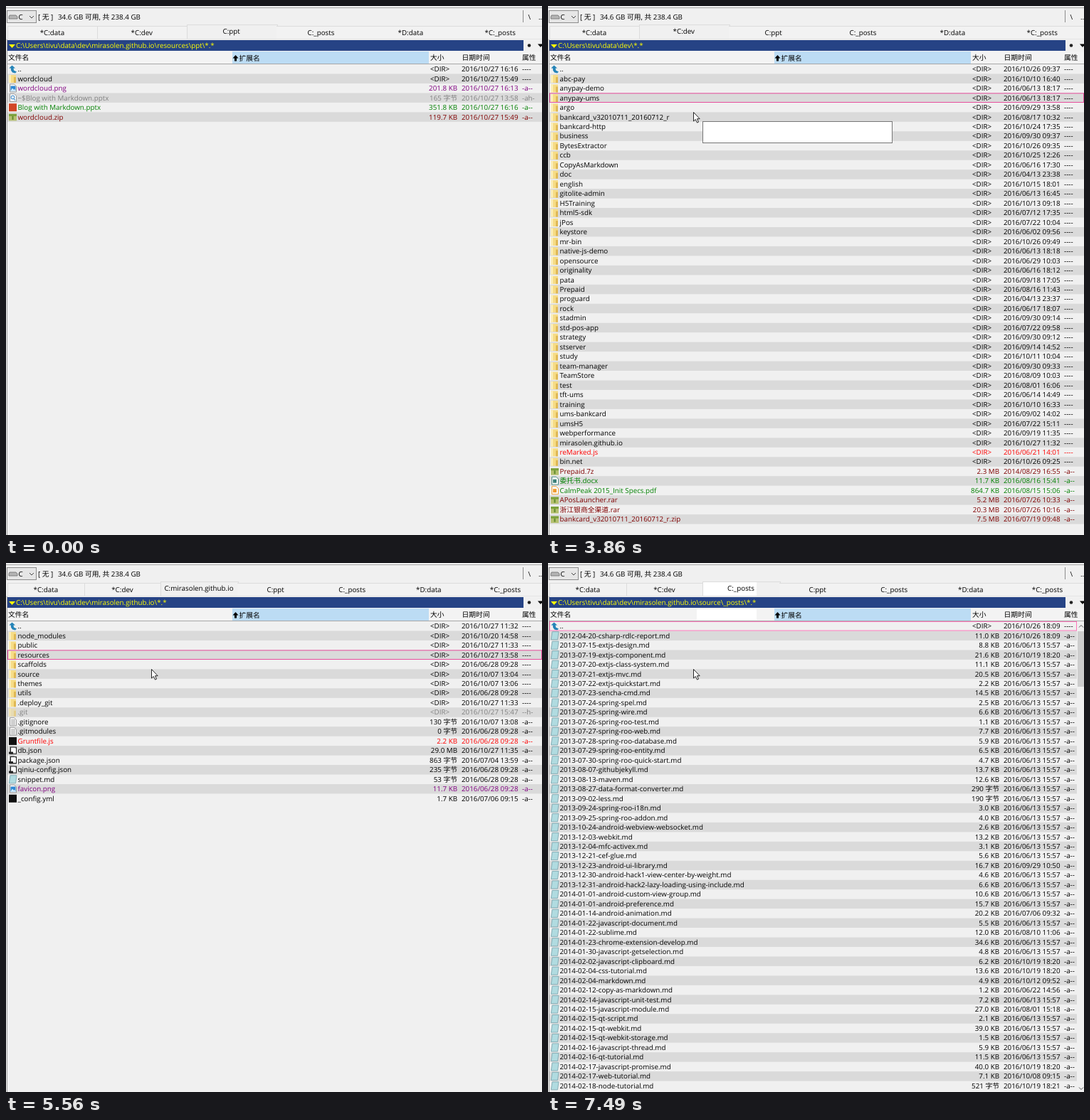
Write an HTML page with a canvas that moves like this. It is 753 px wide and 744 px high and loops after 8 s.

```html
<!DOCTYPE html>
<html lang="zh">
<head>
<meta charset="utf-8">
<title>File manager</title>
<style>
html, body { margin: 0; width: 100%; height: 100%; overflow: hidden; background: #f0f0f0 }
canvas { display: block }
</style>
</head>
<body>
<canvas id="stage" width="753" height="744"></canvas>
<script>
const LOOP = 8000, TOP = 82, PITCH = 13.47;
const ctx = document.getElementById('stage').getContext('2d');
const HOME = 'C:\\Users\\tivu\\data\\dev\\', REPO = 'mirasolen.github.io';
const TABS = ['*C:data', '*C:dev', 'C:ppt', 'C:_posts', '*D:data', '*C:_posts'];
const withTab = name => [...TABS.slice(0, 2), name, ...TABS.slice(2)];

// One row per line: name|size|date|attributes; no size means a folder.
function rows(up, text, usual) {
  const list = text.trim().split('\n').map(line => {
    const [name, size, date, attr] = line.split('|');
    return { name, size, date: date || usual, attr: attr || (size ? '-a--' : '----') };
  });
  return [{ name: '..', date: up, attr: '----' }, ...list];
}

const screens = {
  ppt: { tabs: TABS, active: 2, path: REPO + '\\resources\\ppt\\', rows: rows('10/27 16:16', `
wordcloud||10/27 15:49
wordcloud.png|201.8 KB|10/27 16:13
~$Blog with Markdown.pptx|165 字节|10/27 13:58|-ah-
Blog with Markdown.pptx|351.8 KB|10/27 16:16
wordcloud.zip|119.7 KB|10/27 15:49`) },
  dev: { tabs: TABS, active: 1, path: '', rows: rows('10/26 09:37', `
abc-pay||10/10 16:40
anypay-demo||06/13 18:17
anypay-ums||06/13 18:17
argo||09/29 13:58
bankcard_v32010711_20160712_r||08/17 10:32
bankcard-http||10/24 17:35
business||09/30 09:37
BytesExtractor||10/26 09:35
ccb||10/25 12:26
CopyAsMarkdown||06/16 17:30
doc||04/13 23:38
english||10/15 18:01
gitolite-admin||06/13 16:45
H5Training||10/13 09:18
html5-sdk||07/12 17:35
jPos||07/22 10:04
keystore||06/02 09:56
mr-bin||10/26 09:49
native-js-demo||06/13 18:18
opensource||06/29 10:03
originality||06/16 18:12
pata||09/18 17:05
Prepaid||08/16 11:43
proguard||04/13 23:37
rock||06/17 18:07
stadmin||09/30 09:14
std-pos-app||07/22 09:58
strategy||09/30 09:12
stserver||09/14 14:52
study||10/11 10:04
team-manager||09/30 09:33
TeamStore||08/09 10:03
test||08/01 16:06
tft-ums||06/14 14:49
training||10/10 16:33
ums-bankcard||09/02 14:02
umsH5||07/22 15:11
webperformance||09/19 11:35
${REPO}||10/27 11:32
reMarked.js||06/21 14:01
bin.net||10/26 09:25
Prepaid.7z|2.3 MB|2014/08/29 16:55
委托书.docx|11.7 KB|08/16 15:41
CalmPeak 2015_Init Specs.pdf|864.7 KB|08/15 15:06
APosLauncher.rar|5.2 MB|07/26 10:33
浙江银商全渠道.rar|20.3 MB|07/26 10:16
bankcard_v32010711_20160712_r.zip|7.5 MB|07/19 09:48`) },
  repo: { tabs: withTab('C:' + REPO), active: 2, path: REPO + '\\', rows: rows('10/27 11:32', `
node_modules||10/20 14:58
public||10/27 11:33
resources||10/27 13:58
scaffolds||06/28 09:28
source||10/07 13:04
themes||10/07 13:06
utils||06/28 09:28
.deploy_git||10/27 11:33
.git||10/27 15:47|--h-
.gitignore|130 字节|10/07 13:08
.gitmodules|0 字节
Gruntfile.js|2.2 KB
db.json|29.0 MB|10/27 11:35
package.json|863 字节|07/04 13:59
qiniu-config.json|235 字节
snippet.md|53 字节
favicon.png|11.7 KB
_config.yml|1.7 KB|07/06 09:15`, '06/28 09:28') },
  source: { tabs: withTab('C:source'), active: 2, path: REPO + '\\source\\', pink: '#ff69b4',
    rows: rows('10/07 13:04', `
_drafts||10/19 18:20
_posts||10/26 18:09
stratege||08/22 09:04
.gitignore|28 字节|06/13 15:57
CNAME|16 字节|06/13 15:57
_mdwriter.cson|4.9 KB|10/07 13:04`) },
  posts: { tabs: withTab('C:_posts'), active: 2, path: REPO + '\\source\\_posts\\', pink: '#ff69b4', scroll: true,
    rows: rows('10/26 18:09', `
2012-04-20-csharp-rdlc-report.md|11.0 KB|10/26 18:09
2013-07-15-extjs-design.md|8.8 KB
2013-07-19-extjs-component.md|21.6 KB|10/19 18:20
2013-07-20-extjs-class-system.md|11.1 KB
2013-07-21-extjs-mvc.md|20.5 KB
2013-07-22-extjs-quickstart.md|2.2 KB
2013-07-23-sencha-cmd.md|14.5 KB
2013-07-24-spring-spel.md|2.5 KB
2013-07-25-spring-wire.md|6.6 KB
2013-07-26-spring-roo-test.md|1.1 KB
2013-07-27-spring-roo-web.md|7.7 KB
2013-07-28-spring-roo-database.md|5.9 KB
2013-07-29-spring-roo-entity.md|6.5 KB
2013-07-30-spring-roo-quick-start.md|4.7 KB
2013-08-07-githubjekyll.md|13.7 KB
2013-08-13-maven.md|12.6 KB
2013-08-27-data-format-converter.md|290 字节
2013-09-02-less.md|190 字节
2013-09-24-spring-roo-i18n.md|3.0 KB
2013-09-25-spring-roo-addon.md|4.0 KB
2013-10-24-android-webview-websocket.md|2.6 KB
2013-12-03-webkit.md|13.2 KB
2013-12-04-mfc-activex.md|3.1 KB
2013-12-21-cef-glue.md|5.6 KB
2013-12-23-android-ui-library.md|16.7 KB|09/29 10:50
2013-12-30-android-hack1-view-center-by-weight.md|4.6 KB
2013-12-31-android-hack2-lazy-loading-using-include.md|6.6 KB
2014-01-01-android-custom-view-group.md|10.6 KB
2014-01-01-android-preference.md|15.7 KB
2014-01-14-android-animation.md|20.2 KB|07/06 09:32
2014-01-22-javascript-document.md|5.5 KB
2014-01-22-sublime.md|12.0 KB|08/10 11:06
2014-01-23-chrome-extension-develop.md|34.6 KB
2014-01-30-javascript-getselection.md|4.8 KB
2014-02-02-javascript-clipboard.md|6.2 KB|10/19 18:20
2014-02-04-css-tutorial.md|13.6 KB|10/19 18:20
2014-02-04-markdown.md|4.9 KB|10/12 09:52
2014-02-12-copy-as-markdown.md|1.2 KB|06/22 14:56
2014-02-14-javascript-unit-test.md|7.2 KB
2014-02-15-javascript-module.md|27.0 KB|08/01 15:18
2014-02-15-qt-script.md|2.1 KB
2014-02-15-qt-webkit.md|39.0 KB
2014-02-15-qt-webkit-storage.md|1.5 KB
2014-02-16-javascript-thread.md|5.9 KB
2014-02-16-qt-tutorial.md|11.5 KB
2014-02-17-javascript-promise.md|40.0 KB|10/19 18:20
2014-02-17-web-tutorial.md|7.1 KB|10/08 09:15
2014-02-18-node-tutorial.md|521 字节|10/19 18:21`, '06/13 15:57') }
};

// time, screen in the bars, screen in the list, selected row
const scenes = [
  [0, 'ppt', 'ppt', -1], [2370, 'dev', 'dev', 39], [3060, 'dev', 'dev', 3], [4140, 'dev'],
  [4790, 'repo', 'repo', 0], [5320, 'repo', 'repo', 1], [5440, 'repo', 'repo', 2],
  [5560, 'repo', 'repo', 3], [5720, 'repo', 'repo', 4], [5870, 'repo', 'repo', 5],
  [6300, 'repo'], [6430, 'source', 'source', 0], [6830, 'source', 'source', 1],
  [6950, 'source', 'source', 2], [7100, 'source'], [7220, 'source', 'posts', 0],
  [7490, 'posts', 'posts', 0]
];
// time, x, y of the pointer's tip
const pointer = [
  [0, -50, -50], [970, 113, 307], [1130, 73, 194], [1280, 72, 155], [1410, 71, 125], [1560, 65, 116],
  [1710, 118, 92], [1830, 180, 72], [1980, 198, 63], [2100, 194, 47], [2250, 189, 36],
  [2490, 183, 87], [2640, 120, 122], [2760, 85, 141], [2910, 83, 135], [3060, 150, 141], [3180, 204, 149]
];
const at = (keys, t) => keys.findLast(k => k[0] <= t);

const colors = { png: '#800080', pptx: '#008000', docx: '#008000', pdf: '#008000',
  zip: '#800000', rar: '#800000', '7z': '#800000', js: '#ff0000' };
const squares = { pptx: '#d24726', js: '#111', yml: '#111' };
const badges = { docx: '#3c8078', pdf: '#f09a2c' };

function box(x, y, w, h, fill) {
  ctx.fillStyle = fill;
  ctx.fillRect(x, y, w, h);
}
function frame(x, y, w, h, color, line = 1) {
  ctx.strokeStyle = color;
  ctx.lineWidth = line;
  ctx.strokeRect(x + line / 2, y + line / 2, w - line, h - line);
}
function poly(points, fill, stroke) {
  ctx.beginPath();
  for (let i = 0; i < points.length; i += 2) ctx.lineTo(points[i], points[i + 1]);
  ctx.closePath();
  ctx.fillStyle = fill;
  ctx.fill();
  if (stroke) {
    ctx.strokeStyle = stroke;
    ctx.lineWidth = .9;
    ctx.stroke();
  }
}
// y is the middle of the capitals
function label(s, x, y, color = '#000', align = 'left') {
  ctx.fillStyle = color;
  ctx.textAlign = align;
  ctx.fillText(s, x, y + 3.5);
}
function chevron(x, y, dir, color) {
  ctx.beginPath();
  ctx.moveTo(x - 3, y - 1.5 * dir);
  ctx.lineTo(x, y + 1.5 * dir);
  ctx.lineTo(x + 3, y - 1.5 * dir);
  ctx.strokeStyle = color;
  ctx.lineWidth = 1;
  ctx.stroke();
}

function page(edge = '#909090') {
  poly([1.5, .5, 7.5, .5, 10.5, 3.5, 10.5, 11.5, 1.5, 11.5], '#fbfbfb', edge);
}
function icon(row, ext, y) {
  ctx.save();
  ctx.translate(4, y);
  const hidden = row.attr.includes('h');
  if (row.name === '..') {
    poly([4.5, 1, 9, 5, 6.5, 5, 7, 8, 11, 10, 9, 12, 5, 11, 3, 8, 2.8, 5, .3, 5], '#2584b8');
  } else if (!row.size) {
    if (hidden) ctx.globalAlpha = .45;
    box(0, 1, 10, 11, '#f6dc86');
    box(0, 1, 3, 11, '#fbeeb8');
    box(7, 4, 3, 8, '#dfb855');
  } else if (hidden) {
    page();
    ctx.beginPath();
    ctx.arc(5.5, 5.5, 2.3, 0, 7);
    ctx.moveTo(7, 7.5);
    ctx.lineTo(9, 10);
    ctx.strokeStyle = '#5b9bd0';
    ctx.lineWidth = 1.2;
    ctx.stroke();
  } else if (squares[ext]) {
    box(0, .8, 11, 11, squares[ext]);
  } else if (badges[ext]) {
    page(badges[ext]);
    box(3, 4, 5, 5, badges[ext]);
  } else if (ext === 'png') {
    page();
    box(2.5, 3, 7, 7, '#2c87d3');
    poly([2.5, 10, 5, 6, 7, 8.5, 8, 7, 9.5, 10], '#d8efff');
  } else if (/zip|rar|7z/.test(ext)) {
    box(0, 2, 11, 9.5, '#b5c070');
    box(0, 2, 11, 3, '#7ba03a');
    box(4.5, 5, 2, 5, '#5f8a2a');
  } else if (ext === 'md') {
    poly([2, .7, 11, .7, 9.5, 11.8, .3, 11.8], '#b0dbe0', '#7fa9b1');
  } else {
    page();
    if (ext.startsWith('git')) for (let i = 3; i < 11; i += 2) box(3, i, 6, 1, '#a5a5a5');
    if (ext === 'json') {
      frame(2, 1, 9, 10, '#222');
      box(0, 8, 6, 3, '#222');
    }
  }
  ctx.restore();
}

function drawToolbar() {
  box(0, 2, 753, 1, '#a8a8a8');
  box(1, 6, 42, 18, '#e6e6e6');
  frame(1, 6, 42, 18, '#8c8c8c');
  poly([5, 13, 14, 13, 16, 15, 16, 18, 4, 18, 4, 15], '#b4b4b4', '#777');
  label('C', 17.5, 15.5);
  chevron(36, 15.5, 1, '#444');
  label('[ 无 ]', 45, 15);
  label('34.6 GB 可用, 共 238.4 GB', 73, 15);
  box(726, 6, 1, 17, '#8c8c8c');
  label('\\', 733.5, 15);
  label('...', 748, 15);
}

function drawBars(screen, hover, fresh) {
  const n = screen.tabs.length, step = n === 6 ? 125.85 : 107.6;
  screen.tabs.forEach((name, i) => {
    const on = i === screen.active, x = Math.round(2 + i * step), end = Math.round(2 + (i + 1) * step);
    const y = on ? 26 : 28, w = end - x + (on ? 2 : 1);
    box(x, y, w, 20, on ? '#f0f0f0' : '#f2f2f2');
    if (on && fresh) box(x, y, 293 - x, 20, '#fff');
    box(x, y, w, 1, '#dcdcdc');
    if (i <= screen.active) box(x, y, 1, 46 - y, '#dcdcdc');
    if (i >= screen.active) box(x + w - 1, y, 1, 46 - y, '#dcdcdc');
    label(name, 2 + (i + .5) * step, on ? 35.5 : 37, '#000', 'center');
  });
  box(0, 46, 753, 1, '#e4e4e4');
  box(1, 47, 1, 697, '#a0a0a0');
  box(2, 48, 725, 15, '#264385');
  poly([4, 54, 13, 54, 8.5, 59], '#ffff00');
  label(HOME + screen.path + '*.*', 14, 55.5, '#ffff00');
  ctx.beginPath();
  ctx.arc(735, 55.5, 2.3, 0, 7);
  ctx.fillStyle = '#222';
  ctx.fill();
  poly([747, 53.5, 755, 53.5, 751, 58], '#000');

  box(2, 64, 751, 17, '#f3f3f3');
  if (hover) box(2, 64, 315, 17, '#d9ebf9');
  if (fresh) box(209, 65, 84, 15, '#fff');
  box(318, 64, 276, 17, '#bcdcf4');
  box(2, 81, 751, 1, '#a8a8a8');
  poly([322.5, 69, 326.5, 73.5, 324, 73.5, 324, 77.5, 321, 77.5, 321, 73.5, 318.5, 73.5], '#000');
  label('文件名', 3, 72.5);
  label('扩展名', 327.5, 73);
  label('大小', 596, 72.5);
  label('日期时间', 640.5, 72.5);
  label('属性', 725, 72.5);
}

function drawList(screen, selected) {
  const right = screen.scroll ? 743 : 753;
  screen.rows.forEach((row, i) => {
    const y = TOP + i * PITCH, mid = y + 6.7;
    const ext = row.name.includes('.') ? row.name.split('.').pop() : '';
    const color = row.attr.includes('h') ? '#808080' : colors[ext] || '#000';
    if (i % 2) box(2, y, right - 2, PITCH, '#dadada');
    icon(row, ext, y + .5);
    label(row.name, 16.5, mid, color);
    if (row.size) label(row.size, 634, mid, color, 'right');
    else label('<DIR>', 596, mid, color);
    label(row.date.length > 11 ? row.date : '2016/' + row.date, 640, mid, color);
    label(row.attr, 725, mid, color);
  });
  if (selected >= 0) {
    const y = TOP + selected * PITCH;
    frame(2, y, right - 2, PITCH, screen.pink || '#e83e96', .9);
    if (screen === screens.source && !selected) box(2, y + 12.6, 751, .9, '#6a6a6a');
  }
  if (screen.scroll) {
    box(743, 82, 10, 662, '#f0f0f0');
    box(744, 96, 9, 78, '#cdcdcd');
    chevron(749, 89, -1, '#555');
    chevron(749, 739, 1, '#555');
  }
}

function drawPointer(x, y) {
  ctx.save();
  ctx.translate(x + .5, y + .5);
  poly([0, 0, 0, 12.5, 2.8, 10, 5, 14.6, 7, 13.7, 5, 9.2, 8.7, 9.2], '#fff', '#111');
  ctx.restore();
}

function draw(t) {
  const [, bars, list, selected] = at(scenes, t), [, x, y] = at(pointer, t);
  ctx.font = '9.8px "Open Sans", "Noto Sans", "Noto Sans CJK SC", "Noto Sans CJK", sans-serif';
  ctx.textRendering = 'geometricPrecision';
  box(0, 0, 753, 744, '#f0f0f0');
  drawToolbar();
  drawBars(screens[bars], t >= 1830 && t < 2100, bars === 'posts');
  if (list) drawList(screens[list], selected);
  if (t >= 3860 && t < 4140) {
    box(217, 162, 267, 31, '#fff');
    frame(217, 162, 267, 31, '#767676');
  }
  drawPointer(x, y);
}

function tick() {
  draw(performance.now() % LOOP);
  requestAnimationFrame(tick);
}
tick();
</script>
</body>
</html>
```
